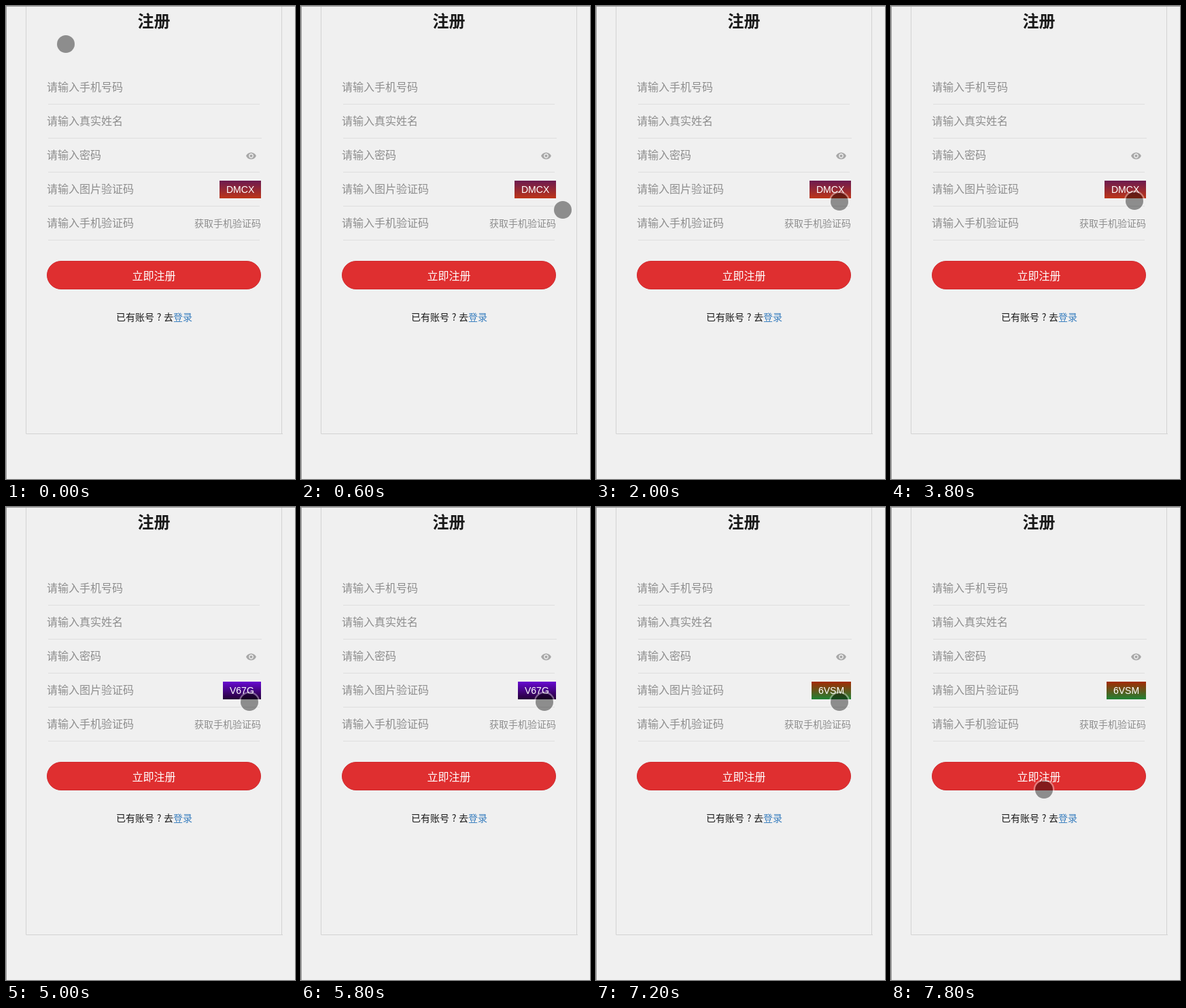
An HTML page for the animation above (8000 ms loop, 425 by 696 pixels).

```html
<!DOCTYPE html>
<html lang="zh-CN">
<head>
<meta charset="utf-8">
<title>注册</title>
<style>
  html, body { margin: 0; width: 100%; height: 100%; overflow: hidden; background: #f0f0f0; }
  svg { display: block; font-family: "Noto Sans CJK SC", "Noto Sans CJK", sans-serif; }
  .frame { fill: none; stroke: #d3d3d3; }
  .rule { stroke: #dedede; }
  .hint { font-size: 16px; fill: #8e8e8e; }
  .small { font-size: 14px; }
  .middle { text-anchor: middle; }
  #codeText { font: 14px "Liberation Sans", Arial, sans-serif; fill: #fff; }
</style>
</head>
<body>
<svg width="425" height="696" viewBox="0 0 425 696">
  <defs>
    <linearGradient id="codeFill" x1="0" y1="0" x2="0" y2="1">
      <stop id="codeTop" offset="0"/>
      <stop id="codeBottom" offset="1"/>
    </linearGradient>
  </defs>
  <rect width="425" height="696" fill="#f0f0f0"/>
  <path d="M0 .5H425M.5 0V696" stroke="#999"/>
  <path class="frame" d="M29.5 1V629.5H407M405.5 1V629.5"/>
  <text class="middle" x="217.5" y="31" font-size="24" font-weight="700" fill="#1a1a1a">注册</text>
  <g id="fields"></g>
  <path fill="#a8a8a8" transform="translate(360.5 220.5) scale(.68) translate(-12 -12)" d="M12 4.5C7 4.5 2.73 7.61 1 12c1.73 4.39 6 7.5 11 7.5s9.27-3.11 11-7.5c-1.73-4.39-6-7.5-11-7.5zM12 17c-2.76 0-5-2.24-5-5s2.24-5 5-5 5 2.24 5 5-2.24 5-5 5zm0-8c-1.66 0-3 1.34-3 3s1.34 3 3 3 3-1.34 3-3-1.34-3-3-3z"/>
  <rect id="codeBox" y="257" height="26" fill="url(#codeFill)"/>
  <text id="codeText" y="275"></text>
  <text class="small" x="277" y="325" fill="#8e8e8e">获取手机验证码</text>
  <rect x="60.5" y="375.5" width="314" height="41" rx="20.5" fill="#df2f30" stroke="#cf2a2e"/>
  <text class="middle" x="217.5" y="403" font-size="16" fill="#fff">立即注册</text>
  <g class="small" fill="#1a1a1a">
    <text x="162" y="463">已有账号</text>
    <text class="middle" x="225" y="463">?</text>
    <text x="232" y="463">去<tspan fill="#377dbe">登录</tspan></text>
  </g>
  <g id="cursor">
    <circle r="14.2" fill="none" stroke="#f0f0f0" stroke-opacity=".4" stroke-width="2.4"/>
    <circle r="13" fill="#000" fill-opacity=".41"/>
  </g>
</svg>
<script>
const LOOP = 8000;
const byId = id => document.getElementById(id);

const hints = ['手机号码', '真实姓名', '密码', '图片验证码', '手机验证码'];
byId('fields').innerHTML = hints.map((hint, i) => {
  const y = 125 + i * 50;
  return `<text class="hint" x="60" y="${y}">请输入${hint}</text>
    <path class="rule" d="M62 ${y + 19.5}H${i === 1 ? 376 : 373}"/>`;
}).join('');

// [start, x, y]; no position hides the cursor
const cursorSteps = [
  [0, 88, 56], [200], [400, 143, 155], [600, 385, 300], [800, 379, 296],
  [1000, 371, 292], [1200, 365, 289], [1400, 364, 289], [1600, 363, 290],
  [1800, 362, 290], [2000, 358, 288], [3800, 358, 287],
  [7600, 223, 416], [7800, 225, 416]
];

// [start, code, width, top colour, bottom colour]
const codeSteps = [
  [0, 'DMCX', 61, '#6c1b50', '#bd3518'],
  [5000, 'V67G', 56, '#6809d2', '#240035'],
  [6400, 'OD3G', 60, '#a02c74', '#8b0045'],
  [6800, '6VSM', 58, '#a42a04', '#1f8233']
];

const stepAt = (steps, time) => steps.filter(([start]) => start <= time).pop();

function render(time) {
  const [, x, y] = stepAt(cursorSteps, time);
  const cursor = byId('cursor');
  cursor.style.display = x === undefined ? 'none' : '';
  if (x !== undefined) cursor.setAttribute('transform', `translate(${x} ${y})`);

  const [, code, width, top, bottom] = stepAt(codeSteps, time);
  byId('codeBox').setAttribute('x', 375 - width);
  byId('codeBox').setAttribute('width', width);
  byId('codeText').setAttribute('x', 385 - width);
  byId('codeText').textContent = code;
  byId('codeTop').setAttribute('stop-color', top);
  byId('codeBottom').setAttribute('stop-color', bottom);
}

let origin;
function tick(now) {
  origin ??= now;
  render((now - origin) % LOOP);
  requestAnimationFrame(tick);
}
render(0);
requestAnimationFrame(tick);
</script>
</body>
</html>
```
